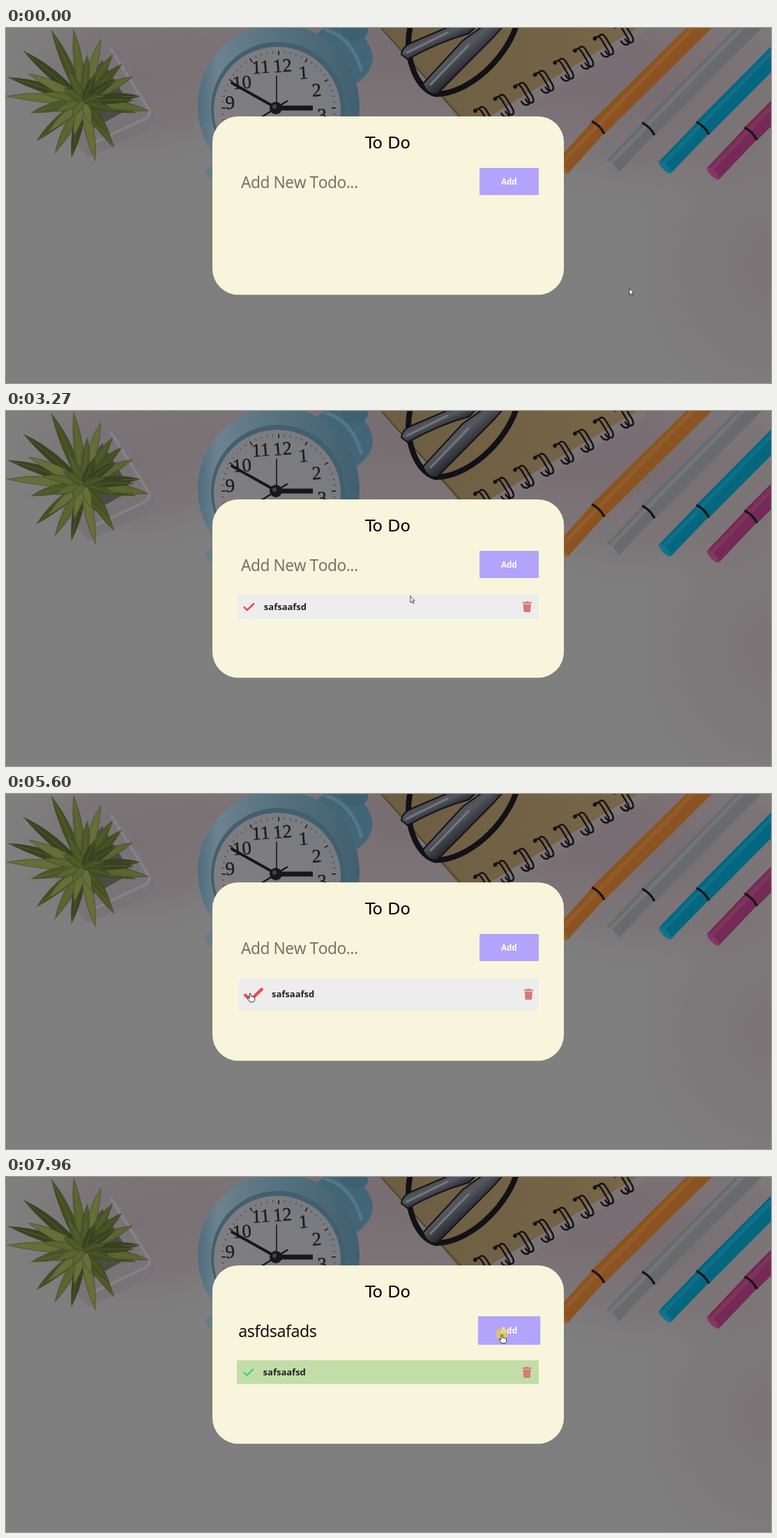
An HTML page that plays this animation: 1097x510 px, repeating every 8 s.

```html
<!DOCTYPE html>
<html lang="en">
<head>
<meta charset="utf-8">
<title>To Do</title>
<style>
  html, body { margin: 0; width: 100%; height: 100%; overflow: hidden; background: #7f7f7f; }
  svg { display: block; width: 100%; height: 100%; }
  text { font-family: "Noto Sans", "Open Sans", sans-serif; }
  .title { font: 23.6px "DejaVu Sans", sans-serif; text-anchor: middle; }
  .field { font-size: 22.7px; letter-spacing: -.45px; font-kerning: none; }
  .bold { font-weight: 700; }
  .num { font: 27px "Liberation Serif", "Noto Serif", serif; text-anchor: middle; fill: #1c1b1f; stroke: #1c1b1f; stroke-width: .4px; }
</style>
</head>
<body>
<svg viewBox="0 0 1097 510" preserveAspectRatio="none">
  <defs>
    <radialGradient id="pink"><stop offset="0" stop-color="#75676d"/><stop offset=".55" stop-color="#796d72" stop-opacity=".8"/><stop offset="1" stop-color="#7f7f7f" stop-opacity="0"/></radialGradient>
    <linearGradient id="blue" x1="0" x2="1"><stop offset="0" stop-color="#4f6c7d"/><stop offset=".12" stop-color="#6d828e"/><stop offset=".5" stop-color="#56717f"/><stop offset="1" stop-color="#41606f"/></linearGradient>
    <linearGradient id="dial" x1="0" y1="1" x2="1" y2="0"><stop offset="0" stop-color="#827f83"/><stop offset="1" stop-color="#787a7f"/></linearGradient>
    <linearGradient id="paper" x1="0" x2="1"><stop offset="0" stop-color="#6c5d43"/><stop offset="1" stop-color="#786647"/></linearGradient>
    <linearGradient id="glass" x1="0" y1="0" x2="1" y2="1"><stop offset="0" stop-color="#1b1c22"/><stop offset=".42" stop-color="#55585f"/><stop offset=".58" stop-color="#25262d"/><stop offset="1" stop-color="#131318"/></linearGradient>
  </defs>

  <rect width="1097" height="510" fill="#7f7f7f"/>
  <ellipse cx="600" cy="20" rx="540" ry="190" fill="url(#pink)" opacity=".8"/>
  <ellipse cx="940" cy="90" rx="320" ry="190" fill="url(#pink)" opacity=".7"/>
  <ellipse cx="190" cy="70" rx="210" ry="150" fill="url(#pink)" opacity=".6"/>
  <ellipse cx="1100" cy="340" rx="230" ry="260" fill="url(#pink)" opacity=".45"/>

  <g id="plant">
    <path d="M118 186 L200 148 Q222 132 208 108 L158 24 Q146 12 128 24 L70 130 Z" fill="#777377"/>
    <path d="M150 30 L204 116 Q209 126 198 131 L124 166" fill="none" stroke="#858184" stroke-width="4"/>
    <path d="M138 46 L180 114 L126 144 L80 120 Z" fill="#4b4c42"/>
  </g>

  <g id="clock">
    <path d="M284 205 L300 195 L304 213 L290 217 Z" fill="#687c87"/>
    <path d="M444 12 Q456 -6 480 -4 Q520 4 526 42 Q526 62 504 79 Z" fill="#426678"/>
    <path d="M456 2 Q496 12 510 62" fill="none" stroke="#557684" stroke-width="5"/>
    <ellipse cx="500" cy="4" rx="19" ry="14" fill="#3d6072"/>
    <ellipse cx="391" cy="112" rx="116" ry="118" fill="url(#blue)"/>
    <ellipse cx="390" cy="116" rx="96" ry="96" fill="#435f6e"/>
    <ellipse cx="389" cy="118" rx="91" ry="91" fill="url(#dial)"/>
    <g id="dialmarks"></g>
    <g stroke="#17161a" stroke-linecap="round">
      <path d="M388 115 L388 69" stroke-width="1.6"/>
      <path d="M360 132 L403 105" stroke-width="2.5"/>
      <path d="M324 79 L388 115" stroke-width="4"/>
      <path d="M388 115 L440 115" stroke-width="7" stroke-linecap="butt"/>
    </g>
    <circle cx="387" cy="115" r="9" fill="#19181d"/><circle cx="385" cy="113" r="3" fill="#46454c"/>
  </g>

  <g id="notebook">
    <path d="M912 -4 L920 4 L708 140 L660 140 Z" fill="#7b7577"/>
    <path d="M536 -4 L912 -4 L672 140 L648 128 Z" fill="url(#paper)"/>
    <path d="M538 0 L652 128" stroke="#504531" stroke-width="2"/>
    <g id="coils" fill="none" stroke="#131216" stroke-linecap="round"></g>
    <path d="M580 -4 C570 40 588 88 616 95 C662 95 716 46 732 -4" fill="none" stroke="#121116" stroke-width="8"/>
    <g fill="url(#glass)" stroke="#141318" stroke-width="2">
      <path d="M567 38 Q568 26 584 20 L640 -4 L676 -4 L664 8 Q620 20 576 45 Z"/>
      <path d="M598 80 L655 18 L686 -4 L714 -4 L700 12 L618 95 Q604 96 598 80 Z"/>
    </g>
    <path d="M574 36 L634 6 M608 82 L664 24" stroke="#74777d" stroke-width="3"/>
  </g>

  <g id="pens"></g>

  <rect x="296" y="127" width="504" height="256.2" rx="37" fill="#f8f5dc"/>
  <text class="title" x="547.5" y="173">To Do</text>

  <g id="button">
    <rect x="679" y="201" width="85" height="39" rx="1.5" fill="#b2a4fc"/>
    <text class="bold" x="721.3" y="225" font-size="11.6" fill="#fff" text-anchor="middle">Add</text>
  </g>
  <rect id="cover" x="678.6" y="200" width="1" height="41" fill="#f8f5dc"/>
  <g id="input">
    <text id="entry" class="field" x="337" y="229.5"></text>
    <rect id="caret" y="207" width="1" height="27.5" fill="#222"/>
  </g>

  <g id="row">
    <rect id="strip" rx="1"/>
    <path id="check" d="M-12 1 L-4.5 8 L11.5 -7.5" fill="none" stroke-width="4.4" stroke-linecap="round" stroke-linejoin="round"/>
    <text id="label" class="bold" font-size="13" fill="#1f1f1f">safsaafsd</text>
    <g id="bin" fill="#d57775">
      <path d="M-6.5 -6.2 V-7 H-2.5 L-1.7 -8 H1.7 L2.5 -7 H6.5 V-5 H-6.5 Z"/>
      <path d="M-5.5 -4 H5.5 L4.8 6.6 Q4.7 7.7 3.6 7.7 H-3.6 Q-4.7 7.7 -4.8 6.6 Z"/>
      <path id="ribs" d="M-2.3 -2 V5.5 M0 -2 V5.5 M2.3 -2 V5.5" stroke="#c3907c" stroke-width=".7"/>
    </g>
  </g>

  <circle id="press" r="8.8" fill="#e8cf3c" opacity=".72"/>
  <g id="pointer">
    <path id="arrow" d="M0 0 V9.6 L2.2 7.6 L3.8 11 L5.1 10.3 L3.6 7.1 H6.3 Z" fill="#fff" stroke="#222" stroke-width=".8"/>
    <path id="beam" d="M-2.5 -5 Q0 -5 0 -4 Q0 -5 2.5 -5 M0 -4 V4 M-2.5 5 Q0 5 0 4 Q0 5 2.5 5" fill="none" stroke="#333" stroke-width="1"/>
    <path id="hand" d="M-1 1 Q0 -.6 1.1 1 V5 Q2 4.2 3 5.2 Q4 4.6 4.8 5.6 Q6.4 5.2 6.7 7 V9.5 Q6.6 11.5 5.3 12.8 H-.4 Q-1.4 11 -3.6 8.2 Q-4.6 6.6 -3 6.4 L-1 8 Z" fill="#fff" stroke="#222" stroke-width=".9" stroke-linejoin="round"/>
  </g>
</svg>

<script>
const LOOP = 8000;
const $ = id => document.getElementById(id);
const set = (el, attrs) => { for (const k in attrs) el.setAttribute(k, attrs[k]); return el; };
const add = (parent, tag, attrs) =>
  parent.appendChild(set(document.createElementNS('http://www.w3.org/2000/svg', tag), attrs));
const show = (el, on) => { el.style.display = on ? '' : 'none'; };
const mix = (a, b, p) => a + (b - a) * p;

// Still scene
function drawLeaves() {
  const greens = ['#444f22', '#596330', '#384321', '#666d38', '#4c5728'];
  const tips = [[65, 3], [97, 2], [25, 33], [136, 16], [153, 38], [166, 52], [182, 70], [3, 71], [1, 98],
    [36, 122], [44, 162], [70, 180], [94, 186], [128, 191], [155, 172], [186, 122], [205, 119], [192, 98], [32, 66], [58, 150]];
  const leaf = (x, y, w, i) => {
    const cx = 111, cy = 107, d = Math.hypot(x - cx, y - cy);
    const nx = (cy - y) / d * w, ny = (x - cx) / d * w;
    const mx = mix(cx, x, .5), my = mix(cy, y, .5) - 4;
    add($('plant'), 'path', {
      d: `M${cx - nx * .4} ${cy - ny * .4} Q${mx - nx * 1.7} ${my - ny * 1.7} ${x} ${y} Q${mx + nx * 1.7} ${my + ny * 1.7} ${cx + nx * .4} ${cy + ny * .4} Z`,
      fill: greens[i % 5], stroke: '#333b1e', 'stroke-width': .5
    });
    add($('plant'), 'path', { d: `M${cx} ${cy} Q${mx} ${my} ${x} ${y}`, fill: 'none', stroke: '#72773f', 'stroke-width': 1, opacity: .5 });
  };
  tips.forEach(([x, y], i) => leaf(x, y, 7, i));
  for (let i = 0; i < 15; i++) {
    const a = i * 2.4, r = 72 - i * 3.2;
    leaf(111 + Math.cos(a) * r, 104 + Math.sin(a) * r, 6, i + 2);
  }
}

function drawClock() {
  const g = $('dialmarks');
  for (let i = 0; i < 60; i++) {
    const a = i * Math.PI / 30, s = Math.sin(a), c = Math.cos(a), r = i % 5 ? 79 : 76;
    add(g, 'path', { d: `M${391 + s * r} ${115 - c * r} L${391 + s * 82} ${115 - c * 82}`, stroke: '#2c2b30', 'stroke-width': i % 5 ? .8 : 2 });
  }
  [[12, 397, 63], [1, 427, 73], [2, 446, 98], [3, 454, 134], [9, 322, 116], [10, 339, 87], [11, 366, 65]]
    .forEach(([n, x, y]) => { add(g, 'text', { class: 'num', x, y, transform: `rotate(-4 ${x} ${y})` }).textContent = n; });
}

function drawCoils() {
  for (let i = 0; i < 8; i++) {
    const x = 873 - i * 28.6, y = -3 + i * 17.3;
    for (const k of [0, 6])
      add($('coils'), 'path', {
        d: `M${x + k} ${y - k * .5} q5 -5 10 3 l9 15 q4 9 -3 9 q-4 0 -7 -5`, 'stroke-width': 2.5
      });
    add($('coils'), 'circle', { cx: x, cy: y + 1, r: 2.5, fill: '#131216' });
  }
}

function drawPens() {
  const pens = [
    ['#8c5322', '#96602c', 802, 196, 1006, -12, 849, 143],
    ['#686a6d', '#77797c', 874, 195, 1077, -12, 921, 145],
    ['#056680', '#12748c', 950, 195, 1120, 22, 999, 144],
    ['#742a54', '#823861', 1019, 204, 1120, 100, 1068, 152]
  ];
  for (const [base, light, x, y, x2, y2, bx, by] of pens) {
    const line = (d, stroke, w, more) => add($('pens'), 'path', { d, stroke, 'stroke-width': w, ...more });
    line(`M${x - 5} ${y + 5} L${bx} ${by}`, base, 24);
    line(`M${bx} ${by} L${x2} ${y2}`, base, 26);
    line(`M${x - 9} ${y + 1} L${x2 - 5} ${y2 - 5}`, light, 6, { opacity: .75 });
    line(`M${bx - 9} ${by - 9} Q${bx + 3} ${by - 3} ${bx + 9} ${by + 9}`, '#17161a', 3.5, { fill: 'none' });
    add($('pens'), 'ellipse', { cx: x - 5, cy: y + 5, rx: 4, ry: 12, fill: light, transform: `rotate(-45 ${x - 5} ${y + 5})` });
  }
}

// Motion tables
const path = [
  [0, 894, 374], [370, 894, 374], [970, 566, 241], [1130, 519, 234], [1960, 519, 234],
  [2190, 690, 236], [2400, 724, 233], [2870, 724, 233], [3240, 590, 264], [3720, 432, 289], [3800, 391, 289],
  [4030, 391, 289], [4240, 347, 286], [4320, 347, 286], [4720, 757, 287], [4790, 749, 287], [4940, 352, 287],
  [5010, 352, 287], [5300, 750, 286], [5600, 350, 286], [5920, 350, 286], [6180, 398, 264], [6370, 465, 240],
  [6420, 481, 228], [7640, 481, 228], [7865, 682, 228], [7950, 711, 226], [8000, 711, 226]
];
const fieldHover = [[970, 1], [2215, 0], [6370, 1], [7865, 0]];
const buttonHover = [[2190, 1], [2960, 0], [7870, 1]];
const rowHover = [[3240, 1], [6180, 0]];
const presses = [[1130, 1200], [2470, 2560], [5830, 5990], [6740, 6800], [7930, 8000]];
const typing = [
  ...[...'safsaafsd'].map((_, i, s) => [1340 + i * 70, s.slice(0, i + 1).join('')]), [2560, ''],
  [7030, 'a'], [7100, 'as'], [7340, 'asfdsa'], [7490, 'asfdsaf'], [7560, 'asfdsafa'], [7630, 'asfdsafads']
];
const within = (t, spans) => spans.some(([a, b]) => t >= a && t < b);

// cubic-bezier(.25, .1, .25, 1)
function ease(x) {
  if (x <= 0) return 0;
  if (x >= 1) return 1;
  const curve = (u, a, b) => 3 * a * u * (1 - u) ** 2 + 3 * b * u * u * (1 - u) + u ** 3;
  let lo = 0, hi = 1;
  for (let i = 0; i < 20; i++) {
    const m = (lo + hi) / 2;
    if (curve(m, .25, .25) < x) lo = m; else hi = m;
  }
  return curve(lo, .1, 1);
}

function hover(t, steps) {
  let v = 0;
  for (const [at, to] of steps) if (t >= at) v = mix(v, to, ease((t - at) / 300));
  return v;
}

function pointerAt(t) {
  const i = Math.max(1, path.findIndex(p => p[0] > t));
  const [a, b] = [path[i - 1], path[i]];
  const p = (t - a[0]) / (b[0] - a[0]);
  return [mix(a[1], b[1], p), mix(a[2], b[2], p)];
}

function kind(x, y, hasRow) {
  if (y > 200 && y < 241) {
    if (x >= 679 && x < 766) return 'hand';
    if (x >= 329 && x < 679) return 'beam';
  }
  if (hasRow && y > 272 && y < 302) {
    if ((x > 340 && x < 369) || (x > 740 && x < 760)) return 'hand';
    if (x > 380 && x < 444) return 'beam';
  }
  return 'arrow';
}

const zoom = (el, x, y, s) => set(el, { transform: `translate(${x} ${y}) scale(${s}) translate(${-x} ${-y})` });

function render(t) {
  const typed = typing.reduce((s, [at, text]) => t >= at ? text : s, '');
  const focus = within(t, [[1200, 2010], [6800, 7700]]);
  zoom($('input'), 505, 221, 1 + .05 * hover(t, fieldHover));
  zoom($('button'), 721.5, 220.5, 1 + .1 * hover(t, buttonHover));
  $('entry').textContent = typed || 'Add New Todo...';
  set($('entry'), { fill: typed ? '#111' : '#757469' });
  show($('caret'), focus);
  set($('caret'), { x: 337.5 + (typed ? $('entry').getComputedTextLength() : 0) });
  show($('cover'), focus);

  const hasRow = t >= 2560, done = t >= 5990, h = hover(t, rowHover);
  show($('row'), hasRow);
  const left = mix(331, 334, h), top = mix(263.2, 265, h);
  set($('strip'), { x: left, y: top, width: 764 - left, height: mix(34.3, 45.8, h), fill: done ? '#c3dda8' : '#ecedec' });
  set($('check'), {
    transform: `translate(${mix(347.8, 355.2, h)} ${mix(280.6, 288, h)}) scale(${mix(.53, 1, h)})`,
    stroke: done ? '#2bdc83' : '#f0484d'
  });
  set($('label'), { x: mix(368.6, 381, h), y: mix(285, 292.4, h) });
  set($('bin'), { transform: `translate(${mix(747, 749.3, h)} ${mix(280.7, 287.8, h)})` });
  show($('ribs'), done);

  const [x, y] = pointerAt(t);
  const shape = kind(x, y, hasRow);
  for (const k of ['arrow', 'beam', 'hand']) show($(k), k === shape);
  set($('pointer'), { transform: `translate(${x} ${y})` });
  show($('press'), within(t, presses));
  set($('press'), { cx: x, cy: y });
}

drawLeaves();
drawClock();
drawCoils();
drawPens();

function tick() {
  render(performance.now() % LOOP);
  requestAnimationFrame(tick);
}
tick();
</script>
</body>
</html>
```
